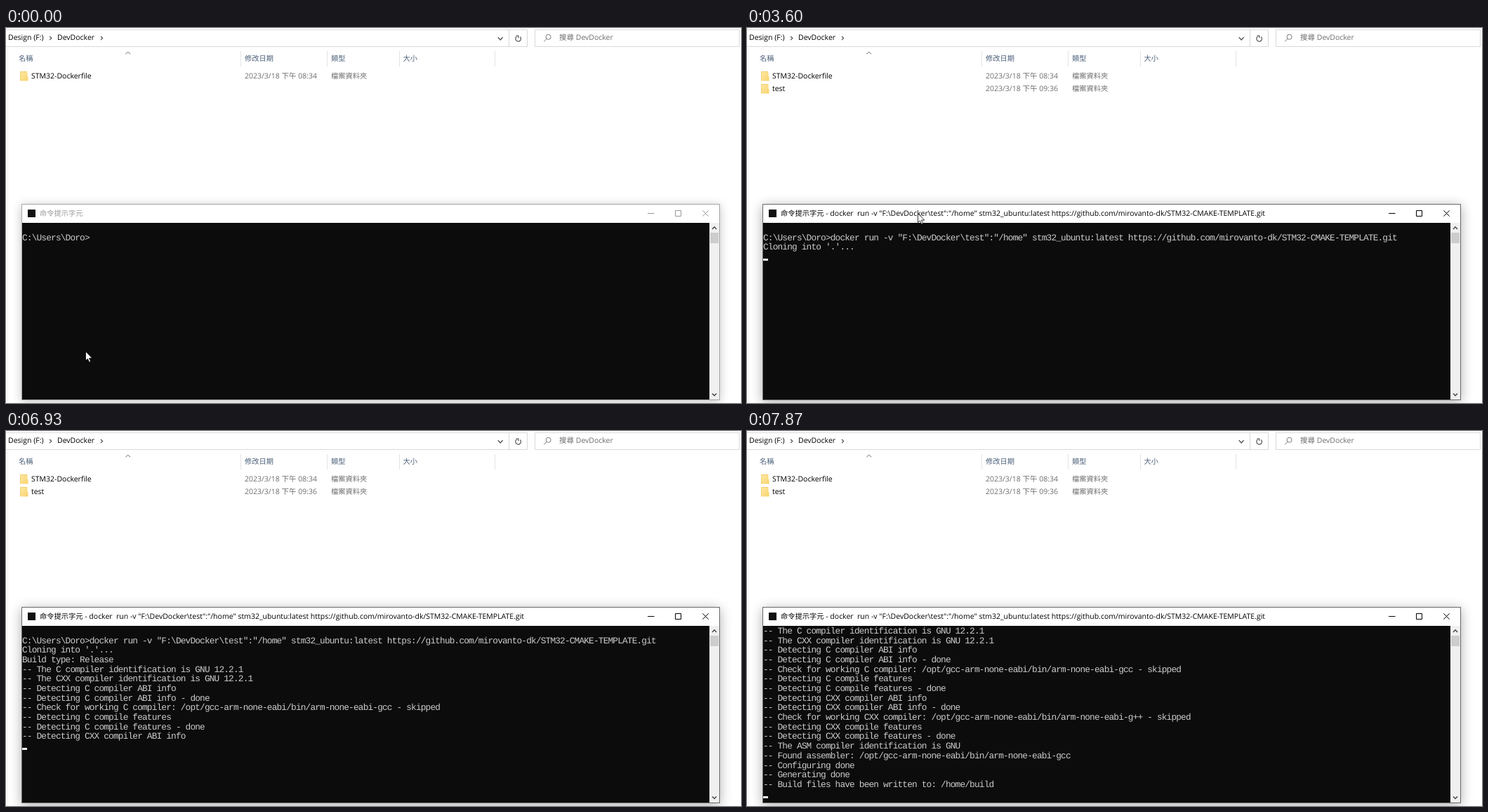
These frames come from a looping animation (1047 px wide and 535 px high, 8000 ms). An HTML page:

```html
<!DOCTYPE html>
<html lang="zh-Hant">
<head>
<meta charset="utf-8">
<title>Docker build</title>
<style>
html, body { margin: 0; width: 100%; height: 100%; overflow: hidden; background: #fff; }
body { position: relative; text-rendering: geometricPrecision; }
body * { position: absolute; }
svg { left: 0; top: 0; }
.t {
  font: 10.5px/20px "Open Sans", "Noto Sans CJK TC", "Noto Sans CJK JP", "Noto Sans CJK", sans-serif;
  white-space: pre; color: #000;
}
.t span { position: static; }
.zh { font-size: 10.26px; }
.head { color: #4c607a; }
.gray { color: #6d6d6d; }
#win {
  left: 22px; top: 251px; width: 993px; height: 278px;
  border: 1px solid #a6a6a6; background: #fff;
  box-shadow: 0 2px 13px rgba(0, 0, 0, .24);
}
#win.on { border-color: #6a6a6a; box-shadow: 0 3px 16px rgba(0, 0, 0, .32); }
#title, #buttons { color: #999; }
.on ~ #title, .on ~ #buttons { color: #000; }
#con { left: 23px; top: 278px; width: 979px; height: 252px; background: #0c0c0c; overflow: hidden; }
#con div {
  left: 0; white-space: pre; color: #ccc;
  font: 12.8px/13.68px "Liberation Mono", monospace;
  letter-spacing: calc(6.84px - 1ch);
}
#con #caret { width: 6.8px; height: 3.2px; background: #f2f2f2; }
</style>
</head>
<body>
<svg width="1047" height="535" fill="none">
  <defs>
    <linearGradient id="fold" x2="1" y2="1">
      <stop stop-color="#ffeaa6"/><stop offset="1" stop-color="#f8d26c"/>
    </linearGradient>
    <g id="folder">
      <path d="M20.5 62h10v6.5l1 1V75.5h-11z" fill="url(#fold)"/>
      <path d="M20.5 75.3V62.4h9" stroke="#eec35a" stroke-width=".8"/>
    </g>
  </defs>
  <path d="M2.5 29V535" stroke="#f1f1f1"/>
  <path d="M0 2.5H742.5V26.5H0M716.5 2.5V26.5M753.5 2.5H1044.5V26.5H753.5Z" stroke="#d9d9d9"/>
  <path d="M334.5 33V55M457.5 33V55M560.5 33V55M696.5 33V55" stroke="#e3e3e3"/>
  <path d="M62.2 12l2.6 2.6-2.6 2.6M135 12l2.6 2.6-2.6 2.6" stroke="#444" stroke-width="1.1"/>
  <path d="M700.8 13.3l3.4 3.6 3.4-3.6" stroke="#555" stroke-width="1.4"/>
  <path d="M727.3 12.3a3.8 3.8 0 1 0 5 .2M726.6 11.2h3.2v3" stroke="#555" stroke-width="1.2"/>
  <g stroke="#777"><circle cx="772.6" cy="12.8" r="3.5"/><path d="M770 15.5l-3.8 3.8"/></g>
  <path d="M170.4 37.2l3.3-3 3.3 3" stroke="#666"/>
  <use href="#folder"/>
  <use href="#folder" y="18" class="test"/>
</svg>
<div id="labels"></div>

<div id="win"></div>
<div class="t" id="title" style="left:48px;top:255px"></div>
<div id="con"></div>
<svg id="buttons" width="1047" height="535" fill="none">
  <rect x="31" y="259" width="11" height="11" fill="#111"/>
  <path d="M914 264.5h9.5M953.5 260.5h8v8h-8zM992.3 260.3l8.4 8.4M1000.7 260.3l-8.4 8.4" stroke="currentColor"/>
  <path d="M1002 278h14v252h-14z" fill="#f0f0f0"/>
  <path d="M1003 292h12v15h-12z" fill="#cdcdcd"/>
  <path d="M1006 287l3-3.2 3 3.2M1006 521.4l3 3.2 3-3.2" stroke="#444" stroke-width="1.4"/>
</svg>
<svg id="mouse" width="14" height="20" style="overflow:visible">
  <path d="M.5 .5V13.6L3.4 10.9 5.5 15.7 7.6 14.8 5.5 10.1H9.7Z" fill="#fff" stroke="#000" stroke-width=".8"/>
</svg>

<script>
const LOOP = 8000, CW = 6.84, LH = 13.68, LAST = 17;
const $ = id => document.getElementById(id);

function add(parent, cls, html, x, y) {
  const el = document.createElement('div');
  el.className = cls;
  el.innerHTML = html;
  el.style.left = x + 'px';
  el.style.top = y + 'px';
  parent.append(el);
  return el;
}

// class, text, x, centre y
[
  ['', 'Design (F:)', 3, 14],
  ['', 'DevDocker', 73, 14],
  ['gray', '搜尋 DevDocker', 788, 14],
  ['zh head', '名稱', 18, 44],
  ['zh head', '修改日期', 340, 44],
  ['zh head', '類型', 463, 44],
  ['zh head', '大小', 565.5, 44],
  ['', 'STM32-Dockerfile', 36, 69],
  ['gray', '2023/3/18 下午 08:34', 340, 69],
  ['zh gray', '檔案資料夾', 463, 69],
  ['test', 'test', 36, 87],
  ['gray test', '2023/3/18 下午 09:36', 340, 87],
  ['zh gray test', '檔案資料夾', 463, 87]
].forEach(([cls, text, x, y]) => add($('labels'), 't ' + cls, text, x, y - 10));

const prompt = 'C:\\Users\\Doro>';
const args = 'run -v "F:\\DevDocker\\test":"/home" stm32_ubuntu:latest ' +
  'https://github.com/mirovanto-dk/STM32-CMAKE-TEMPLATE.git';
const command = 'docker ' + args;
const idle = '<span class="zh">命令提示字元</span>';
const busy = idle + ' - docker  ' + args;

const bin = '/opt/gcc-arm-none-eabi/bin/arm-none-eabi-';
const detect = (lang, cc) => [
  `-- Detecting ${lang} compiler ABI info`,
  `-- Detecting ${lang} compiler ABI info - done`,
  `-- Check for working ${lang} compiler: ${bin}${cc} - skipped`,
  `-- Detecting ${lang} compile features`,
  `-- Detecting ${lang} compile features - done`
];
const lines = [
  '', prompt,
  "Cloning into '.'...",
  'Build type: Release',
  '-- The C compiler identification is GNU 12.2.1',
  '-- The CXX compiler identification is GNU 12.2.1',
  ...detect('C', 'gcc'),
  ...detect('CXX', 'g++'),
  '-- The ASM compiler identification is GNU',
  `-- Found assembler: ${bin}gcc`,
  '-- Configuring done',
  '-- Generating done',
  '-- Build files have been written to: /home/build'
];
const rows = lines.map(() => add($('con'), '', '', 0, 0));
const caret = add($('con'), '', '', 0, 0);
caret.id = 'caret';

// [time, value] steps
const caretRow = [[0, 1], [1530, 2], [2270, 3], [5730, 4], [6070, 5], [6400, 6], [6470, 7],
  [6870, 11], [6930, 12], [7330, 16], [7470, 17], [7530, 19], [7800, 20], [7870, 21]];
const typed = [[0, 0], [930, 3], [1000, 5], [1200, command.length]];
const blink = [[0, 0], [470, 1], [2070, 0], [2270, 1], [3070, 0], [3600, 1],
  [4200, 0], [4670, 1], [5200, 0], [5730, 1]];
const path = [[0, [113, 461]]];
[70, 130, 200, 270, 330, 400, 470].forEach((time, i) => {
  const p = (i + 1) / 7, e = p * p * (3 - 2 * p);
  path.push([time, [113 + 130 * e, 461 - 197 * e]]);
});
path.push([4670, [330, 370]], [4730, [475, 488]], [4800, null]);

const at = (steps, t) => steps.findLast(s => s[0] <= t)[1];
let shown = '';

function draw(t) {
  const row = at(caretRow, t), chars = at(typed, t), lit = at(blink, t), pos = at(path, t);
  const key = [row, chars, lit, pos, t >= 2730].join();
  if (key === shown) return;
  shown = key;

  const scroll = Math.max(0, row - LAST);
  const top = i => .2 + (i - scroll) * LH;
  rows.forEach((el, i) => {
    el.textContent = i === 1 ? prompt + command.slice(0, chars) : i < row ? lines[i] : '';
    el.style.top = top(i) + .8 + 'px';
    el.style.visibility = i < scroll ? 'hidden' : '';
  });
  const col = row === 1 ? prompt.length + chars : 0;
  caret.style.left = col * CW + 'px';
  caret.style.top = top(row) + 9.8 + 'px';
  caret.style.visibility = lit ? '' : 'hidden';

  $('win').className = t >= 470 ? 'on' : '';
  $('title').innerHTML = row > 1 ? busy : idle;
  document.querySelectorAll('.test').forEach(el => {
    el.style.visibility = t >= 2730 ? '' : 'hidden';
  });
  $('mouse').style.visibility = pos ? '' : 'hidden';
  if (pos) $('mouse').style.transform = `translate(${pos[0]}px, ${pos[1]}px)`;
}

const start = performance.now();
function tick() {
  draw((performance.now() - start) % LOOP);
  requestAnimationFrame(tick);
}
tick();
</script>
</body>
</html>
```
